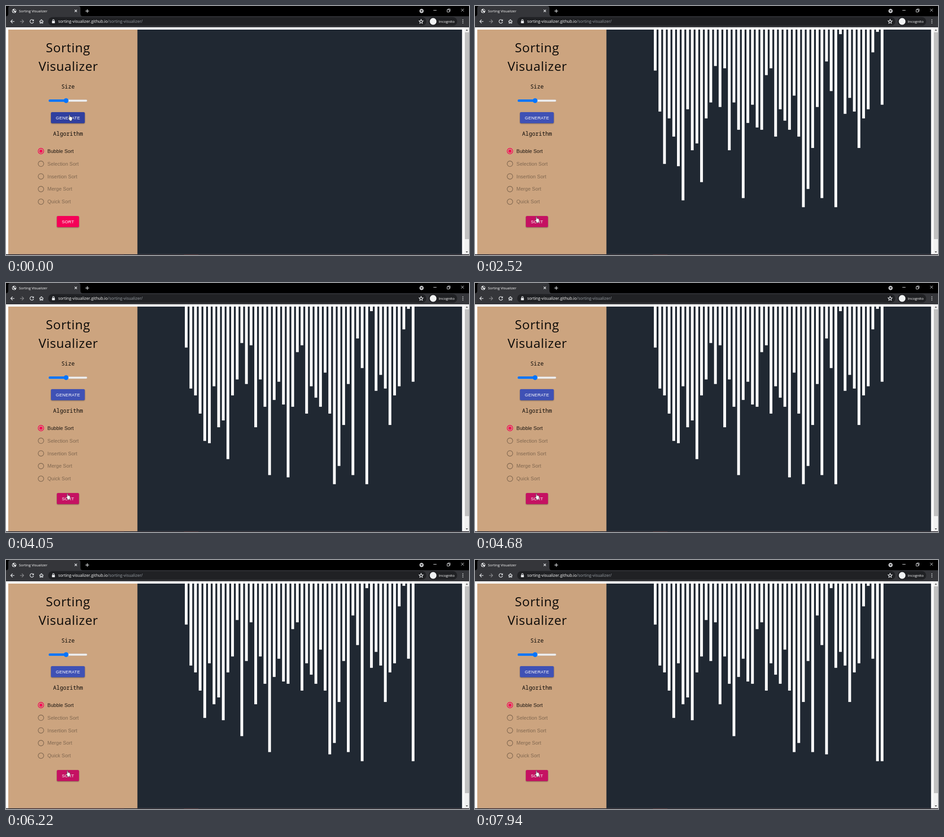
Animation, 1020 px wide and 549 px high, one loop 8 s. Source, as an HTML page:

```html
<!DOCTYPE html>
<html lang="en">
<head>
<meta charset="utf-8">
<title>Sorting Visualizer</title>
<style>
html, body { margin: 0; width: 100%; height: 100%; overflow: hidden; background: #fff; }
svg { display: block; width: 1020px; height: 549px; }
.ui { font-family: "Open Sans", "Noto Sans", sans-serif; fill: #fff; }
.title { font: 28px "Open Sans", "Noto Sans", sans-serif; letter-spacing: .7px; text-anchor: middle; fill: #0c0a08; }
.mono { font: 12.2px "Noto Sans Mono", "DejaVu Sans Mono", monospace; text-anchor: middle; fill: #0c0a08; }
.label { font: 10.88px "Liberation Sans", Arial, sans-serif; letter-spacing: .08px; }
.cap { font: 9.52px "Liberation Sans", Arial, sans-serif; letter-spacing: .22px; text-anchor: middle; fill: #fff; }
.icon { fill: none; stroke: #e8eaed; stroke-width: 1.25; }
.btn { filter: drop-shadow(0 1px 1px rgba(0,0,0,.4)); }
.anim { animation: 8s linear infinite; }
#gen { animation-name: gen; }
#sort { animation-name: sort; }
#genRipple { animation-name: genRipple; transform-origin: 139px 243px; }
#sortRipple { animation-name: sortRipple; transform-origin: 135px 467px; }
#hand { animation-name: hand; }
.ripple { fill: #fff; opacity: 0; }
@keyframes gen { 0%, 21.5% { fill: #303f9f; } 24.6%, 100% { fill: #3f51b5; } }
@keyframes sort { 0%, 28.8% { fill: #f50057; } 31.5%, 100% { fill: #c51162; } }
@keyframes genRipple {
  0%, 8.1% { opacity: 0; transform: scale(0); }
  8.2% { opacity: .3; transform: scale(.1); }
  13% { opacity: .28; transform: scale(1); }
  17.5%, 100% { opacity: 0; transform: scale(1); }
}
@keyframes sortRipple {
  0%, 34.4% { opacity: 0; transform: scale(0); }
  34.5% { opacity: .3; transform: scale(.1); }
  39% { opacity: .28; transform: scale(1); }
  44%, 100% { opacity: 0; transform: scale(1); }
}
@keyframes hand {
  0%, 19.1% { transform: translate(137px, 239px); animation-timing-function: ease-in-out; }
  29.4%, 100% { transform: translate(132.5px, 463.5px); }
}
</style>
</head>
<body>
<svg viewBox="0 0 1020 549">
  <defs>
    <clipPath id="genClip"><rect x="99" y="234" width="74.6" height="24.4" rx="2.7"/></clipPath>
    <clipPath id="sortClip"><rect x="112" y="463" width="48.8" height="24.6" rx="2.7"/></clipPath>
  </defs>

  <!-- browser frame -->
  <rect width="1020" height="47" fill="#000"/>
  <path d="M0 22.5Q5 22.5 5 17V5Q5 0 10 0H159Q164 0 164 5V17Q164 22.5 169 22.5H1020V47H0Z" fill="#35363a"/>
  <circle cx="18" cy="11" r="4.7" fill="#f1f3f4"/>
  <path d="M14.4 9.2l2.5 1 .5 2 1.8 1-1 2.3-1.3-.6-.3-2-2.4-1.6ZM18 7l2.8 1.2 1.2 2.2-1.8 1.2-.8-1.7-1.8-.5Z" fill="#35363a"/>
  <text class="ui" x="28.5" y="13.5" font-size="7.8">Sorting Visualizer</text>
  <g class="icon">
    <path d="M151.3 8.3l5 5m0-5l-5 5"/>
    <path d="M175 11h8m-4-4v8"/>
    <path d="M941.5 9.5h7M1002.7 6.2l6 6m0-6l-6 6" stroke-width="1"/>
    <path d="M971.8 8.3h5v5h-5ZM973.4 8V6.6h5V11.6h-1.4" stroke-width="1"/>
    <path d="M18.5 34h-8m4-4l-4 4 4 4"/>
    <path d="M31 34h8m-4-4l4 4-4 4" stroke="#8a8b8e"/>
    <path d="M60 31.4a4 4 0 1 0 .8 3.6"/>
    <path d="M73.6 34.2l4.4-4 4.4 4M75 33.6v4.2h2v-2.4h2v2.4h2v-4.2"/>
  </g>
  <path d="M61.3 29.3v4h-4Z" fill="#e8eaed"/>
  <circle cx="915.5" cy="11" r="4.7" fill="#c4c5c8"/>
  <path d="M913 9.8h5l-2.5 3Z" fill="#111"/>
  <rect x="93" y="24.5" width="833" height="19" rx="9.5" fill="#202124"/>
  <rect x="101.3" y="33" width="6.4" height="5" rx=".7" fill="#e8eaed"/>
  <path class="icon" d="M102.8 33v-1.4a1.7 1.7 0 0 1 3.4 0V33" stroke-width="1"/>
  <text class="ui" x="115" y="37.2" font-size="8.9">sorting-visualizer.github.io<tspan fill="#9aa0a6">/sorting-visualizer/</tspan></text>
  <path class="icon" d="M914.5 29.6l1.3 3 3.2.3-2.4 2.1.7 3.2-2.8-1.7-2.8 1.7.7-3.2-2.4-2.1 3.2-.3Z" stroke-width=".9"/>
  <rect x="931" y="24.5" width="63" height="19" rx="9.5" fill="#202124"/>
  <circle cx="941" cy="34" r="7.4" fill="#f1f3f4"/>
  <text class="ui" x="953.5" y="37" font-size="8">Incognito</text>
  <g fill="#e8eaed">
    <circle cx="1006.5" cy="30.6" r="1"/><circle cx="1006.5" cy="34" r="1"/><circle cx="1006.5" cy="37.4" r="1"/>
  </g>

  <!-- page -->
  <rect y="47" width="1020" height="502" fill="#fff"/>
  <rect x="5" y="52" width="285" height="495.5" fill="#cca47f"/>
  <rect x="289.5" y="52" width="715.2" height="495.5" fill="#202832"/>
  <rect x="1010" y="47" width="10" height="500.5" fill="#f1f1f1"/>
  <rect x="1011" y="58" width="9" height="456" fill="#c1c1c1"/>
  <path d="M1012.8 54.5l2.5-3 2.5 3Z" fill="#505050"/>
  <path d="M1012.8 541l2.5 3 2.5-3Z" fill="#505050"/>
  <rect y="547.5" width="1020" height="1.5" fill="#17131a"/>
  <path d="M30 548.3h230M392 548.3h32" stroke="#4a2c30"/>

  <g id="bars" fill="#fff"></g>

  <text class="title" x="136.8" y="102">Sorting</text>
  <text class="title" x="137.3" y="142.5">Visualizer</text>
  <text class="mono" x="136.7" y="181.5">Size</text>
  <rect x="94.4" y="206.4" width="84.4" height="4.6" rx="2.3" fill="#efefef" stroke="#c2b8ad" stroke-width=".6"/>
  <rect x="94" y="206" width="40" height="5.3" rx="2.6" fill="#0075ff"/>
  <circle cx="132.4" cy="208.6" r="5.3" fill="#0075ff"/>

  <g class="btn">
    <rect id="gen" class="anim" x="99" y="234" width="74.6" height="24.4" rx="2.7"/>
  </g>
  <g clip-path="url(#genClip)"><circle id="genRipple" class="anim ripple" cx="139" cy="243" r="46"/></g>
  <text class="cap" x="136.5" y="249.6">GENERATE</text>
  <text class="mono" x="136.7" y="285.5">Algorithm</text>
  <g id="radios"></g>
  <g class="btn">
    <rect id="sort" class="anim" x="112" y="463" width="48.8" height="24.6" rx="2.7"/>
  </g>
  <g clip-path="url(#sortClip)"><circle id="sortRipple" class="anim ripple" cx="135" cy="467" r="32"/></g>
  <text class="cap" x="136.5" y="478.6">SORT</text>

  <g id="hand" class="anim">
    <path d="M2 1.3Q2.9 0 3.8 1.3V5Q5 4.3 5.6 5.4 6.8 4.7 7.3 5.9 8.8 5.5 8.8 7.2V10.3Q8.6 12 7.8 12.6V14.2H3.2V12.9L.3 9.2Q-.2 7.6 1.1 7.7L2 8.6Z" fill="#fff" stroke="#222" stroke-width=".7"/>
  </g>
</svg>
<script>
const NS = "http://www.w3.org/2000/svg";
const LOOP = 8000, BARS_AT = 760;
const values = [
  18, 36, 59, 39, 47, 60, 75, 35, 53, 50, 67, 39, 32, 16, 34, 17, 53, 32, 44, 74,
  41, 33, 43, 44, 20, 17, 47, 35, 40, 44, 29, 47, 78, 70, 52, 34, 74, 14, 27, 78,
  2, 37, 30, 36, 52, 39, 35, 10, 1, 33
];
// time in ms, comparisons made so far
const pace = [
  [3080, 0], [3600, 9], [4050, 22], [4125, 22], [4450, 24], [4460, 29], [4765, 29],
  [5220, 41], [5300, 42], [5610, 49], [5990, 55], [6215, 61], [6295, 61], [6770, 74],
  [6850, 79], [7225, 82], [7305, 82], [7630, 92], [7700, 97]
];

function add(parent, tag, attrs, text) {
  const el = document.createElementNS(NS, tag);
  for (const key in attrs) el.setAttribute(key, attrs[key]);
  if (text) el.textContent = text;
  return parent.appendChild(el);
}

const radios = document.getElementById("radios");
["Bubble", "Selection", "Insertion", "Merge", "Quick"].forEach((name, i) => {
  const y = 319.9 + i * 27.9;
  const ring = i ? "rgba(0,0,0,.36)" : "#f50057";
  add(radios, "circle", { cx: 77, cy: y, r: 6.1, fill: "none", stroke: ring, "stroke-width": 1.36 });
  if (!i) add(radios, "circle", { cx: 77, cy: y, r: 3.5, fill: ring });
  add(radios, "text", { class: "label", x: 91.3, y: y + 3.8, fill: i ? "rgba(0,0,0,.38)" : "#17120e" }, name + " Sort");
});

const group = document.getElementById("bars");
const bars = values.map((v, i) =>
  add(group, "rect", { x: 394 + i * 10.2, y: 52, width: 6.1, height: 0 }));

// array after each comparison of the first two bubble passes
const states = [values];
for (let pass = 0; pass < 2; pass++) {
  for (let j = 0; j < values.length - 1 - pass; j++) {
    const a = states[states.length - 1].slice();
    if (a[j] > a[j + 1]) [a[j], a[j + 1]] = [a[j + 1], a[j]];
    states.push(a);
  }
}

function comparisons(t) {
  if (t < pace[0][0]) return 0;
  for (let i = 1; i < pace.length; i++) {
    const [t0, n0] = pace[i - 1], [t1, n1] = pace[i];
    if (t < t1) return Math.floor(n0 + (n1 - n0) * (t - t0) / (t1 - t0));
  }
  return pace[pace.length - 1][1];
}

const start = performance.now();
function draw() {
  const t = (performance.now() - start) % LOOP;
  const state = states[comparisons(t)];
  bars.forEach((bar, i) => bar.setAttribute("height", t < BARS_AT ? 0 : state[i] * 5.02));
  requestAnimationFrame(draw);
}
draw();
</script>
</body>
</html>
```
